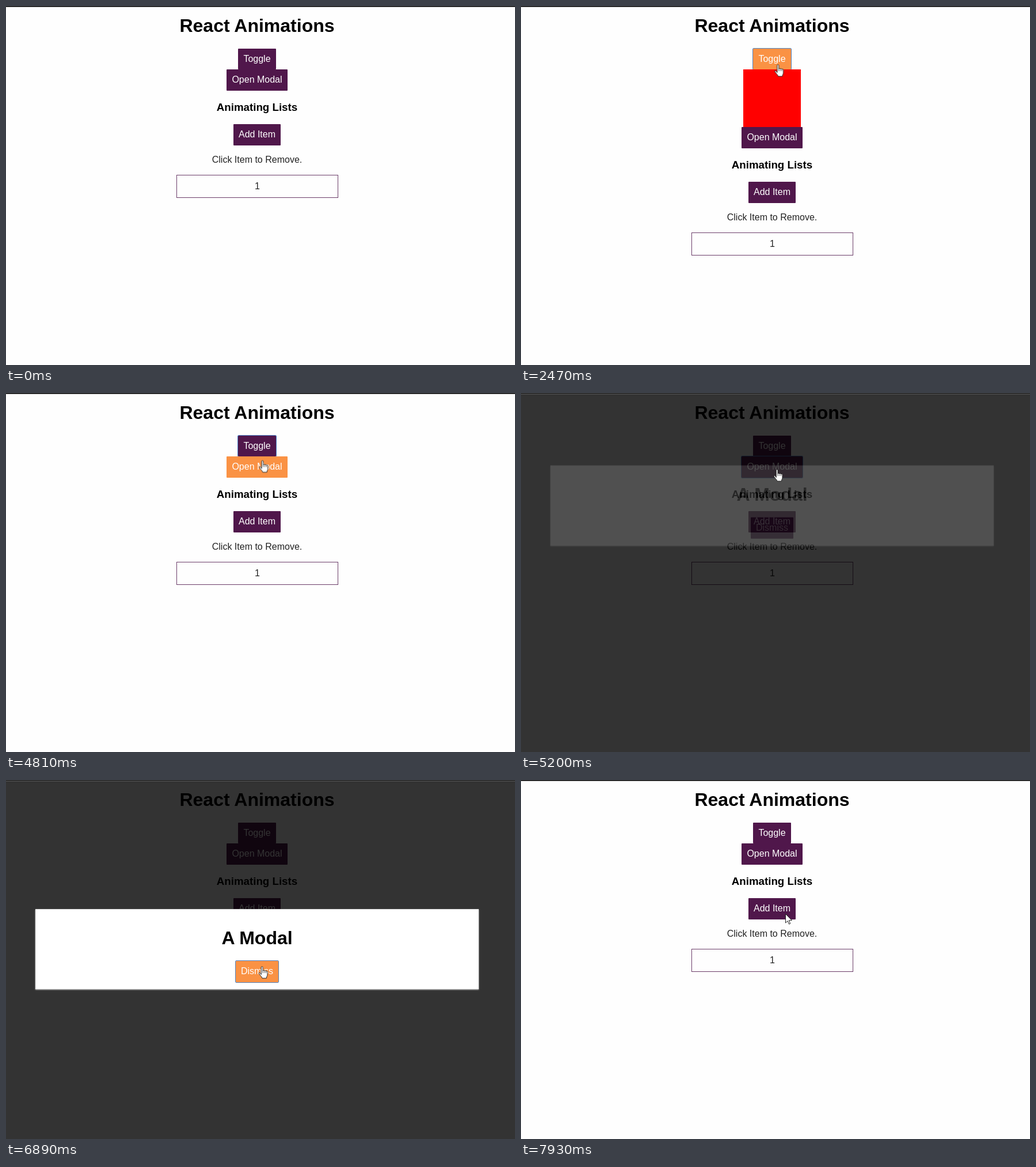
Recreate the animation shown at these times as an HTML page. Size 884x623 px, loop 8 s.

```html
<!DOCTYPE html>
<html lang="en">
<head>
<meta charset="utf-8">
<title>React Animations</title>
<style>
  html, body { margin: 0; width: 100%; height: 100%; overflow: hidden; }
  body { font: 16px "Liberation Sans", Arial, sans-serif; color: #000; }
  #stage { position: absolute; width: 884px; height: 623px; overflow: hidden; background: #fefefe; }
  #stage div { position: absolute; box-sizing: border-box; }
  #edge { width: 884px; height: 2px; background: linear-gradient(#000 50%, #666 50%); }

  .text { left: 0; width: 872px; text-align: center; white-space: nowrap; }
  .h1 { font-size: 32px; font-weight: bold; line-height: 38px; }
  .h3 { font-size: 18.72px; font-weight: bold; line-height: 22px; }
  .p { line-height: 18px; color: #222; }

  .button {
    left: var(--x); top: var(--y); width: var(--w); height: 37px;
    line-height: 36px; text-align: center; white-space: nowrap;
    color: #fff; background: #50174b; outline: 1px solid transparent; border-radius: 1px;
  }
  #toggle { height: 36px; }
  #square { left: 386px; top: 110px; width: 100px; height: 100px; background: #f00; }
  #item {
    left: 296px; top: 293px; width: 281px; height: 40px;
    border: 1px solid #6b3d69; line-height: 38px; text-align: center; color: #222;
  }
  #lower { left: 0; top: 0; }

  #backdrop { left: 0; top: 1px; width: 884px; height: 622px; background: rgba(0, 0, 0, .8); }
  #modal {
    left: 51px; top: 224px; width: 770px; height: 139px;
    background: #fff; border: 1px solid #eee; box-shadow: 0 1px 2px #ccc;
  }
  #modal .text { left: -1px; width: 770px; }

  #cursor { left: 0; top: 0; }
  #cursor svg { position: absolute; overflow: visible; fill: #fff; stroke: #222; stroke-linejoin: round; }
  #hand { left: -6.6px; top: -1.5px; }
  #arrow { left: 0; top: 0; }
</style>
</head>
<body>
<div id="stage">
  <div class="text h1" style="top:15px">React Animations</div>
  <div class="button" id="toggle" style="--x:403px;--y:74px;--w:66px">Toggle</div>
  <div id="square"></div>
  <div id="lower">
    <div class="button" id="open" style="--x:383px;--y:110px;--w:106px">Open Modal</div>
    <div class="text h3" style="top:165px">Animating Lists</div>
    <div class="button" style="--x:395px;--y:205px;--w:82px">Add Item</div>
    <div class="text p" style="top:258px">Click Item to Remove.</div>
    <div id="item">1</div>
  </div>
  <div id="backdrop"></div>
  <div id="modal">
    <div class="text h1" style="top:30px">A Modal</div>
    <div class="button" id="dismiss" style="--x:347px;--y:89px;--w:74px">Dismiss</div>
  </div>
  <div id="cursor">
    <svg id="arrow" width="12" height="19"><path d="M.5.5V16l3.6-3.4 2.4 5.6 2.2-1-2.4-5.500H11.5Z"/></svg>
    <svg id="hand" width="17" height="22">
      <path d="M5.200 14.500V2.200a1.400 1.400 0 0 1 2.800 0V8.600a1.300 1.300 0 0 1 2.800.3a1.300 1.300 0 0 1 2.700.5a1.200 1.200 0 0 1 2.500.8V15c0 2-1.500 3-1.700 6H7C6.500 18.500 3.600 16.500 1.400 12.900C.6 11.500 2.200 10.600 3.200 11.700Z"/>
      <path d="M8 9v3M10.800 9.500V12M13.500 10v2" fill="none" stroke-width=".8"/>
    </svg>
  </div>
  <div id="edge"></div>
</div>
<script>
  const LOOP = 8000, TICK = 130;
  const animations = [];

  // Each step is [ms, style, easing to the next step]; without easing the style holds.
  function play(id, ...steps) {
    const frames = steps.map(([ms, style, easing = 'step-end']) => ({ offset: ms / LOOP, easing, ...style }));
    frames.push({ ...frames[frames.length - 1], offset: 1 });
    const animation = document.getElementById(id).animate(frames, { duration: LOOP, iterations: Infinity });
    animation.pause();
    animations.push(animation);
  }

  const at = (x, y) => ({ transform: `translate(${x}px, ${y}px)` });
  const fade = opacity => ({ opacity });
  const fill = backgroundColor => ({ backgroundColor });
  const ring = outlineColor => ({ outlineColor });
  const sheet = (opacity, y) => ({ opacity, transform: `translateY(${y}%)` });

  const plum = fill('#50174b'), orange = fill('#fa9244');
  const focus = ring('#4f86c9'), blur = ring('transparent');
  const OPEN = 5177, CLOSE = 7090;

  // Toggle and the square
  play('toggle', [0, plum], [1400, orange], [4780, plum]);
  play('toggle', [0, blur], [2300, focus], [5150, blur]);
  play('square', [0, fade(0)], [2300, fade(1)], [3365, fade(1), 'ease-out'], [4365, fade(0)]);
  play('lower', [0, at(0, 0)], [2300, at(0, 100)], [4365, at(0, 0)]);

  // Modal
  play('open', [0, plum], [4780, orange], [OPEN, plum]);
  play('open', [0, blur], [5150, focus], [6630, blur]);
  play('backdrop', [0, fade(0)], [OPEN, fade(1)], [CLOSE, fade(0)]);
  play('modal',
    [0, sheet(0, -100)],
    [OPEN, sheet(0, -100), 'ease-out'],
    [OPEN + 200, sheet(.8, 60), 'ease-out'],
    [OPEN + 400, sheet(1, 0)],
    [CLOSE, sheet(1, 0), 'ease-out'],
    [CLOSE + 200, sheet(.8, 60), 'ease-out'],
    [CLOSE + 400, sheet(0, -100)]);
  play('dismiss', [0, plum], [6200, orange], [CLOSE, plum]);
  play('dismiss', [0, blur], [6630, focus], [CLOSE + 400, blur]);

  // Pointer
  play('cursor',
    [0, at(474, -24)],
    [520, at(474, -24), 'ease-out'],
    [780, at(466, 30)],
    [910, at(466, 30), 'ease-in-out'],
    [1800, at(446.6, 102)],
    [4680, at(446.6, 102), 'ease-in-out'],
    [4940, at(445, 133)],
    [5980, at(445, 133), 'ease-in-out'],
    [6240, at(445, 324)],
    [7540, at(445, 324), 'ease-in-out'],
    [7900, at(459, 232)]);
  const handTimes = [[1400, 1], [6000, 0], [6200, 1], [7540, 0]];
  play('hand', [0, fade(0)], ...handTimes.map(([ms, on]) => [ms, fade(on)]));
  play('arrow', [0, fade(1)], ...handTimes.map(([ms, on]) => [ms, fade(1 - on)]));

  // The picture refreshes once per tick, like a screen recording.
  const start = performance.now();
  function draw(now) {
    const time = Math.max(0, now - start) % LOOP;
    const shown = Math.floor(time / TICK) * TICK;
    for (const animation of animations) animation.currentTime = shown;
    requestAnimationFrame(draw);
  }
  draw(start);
</script>
</body>
</html>
```
